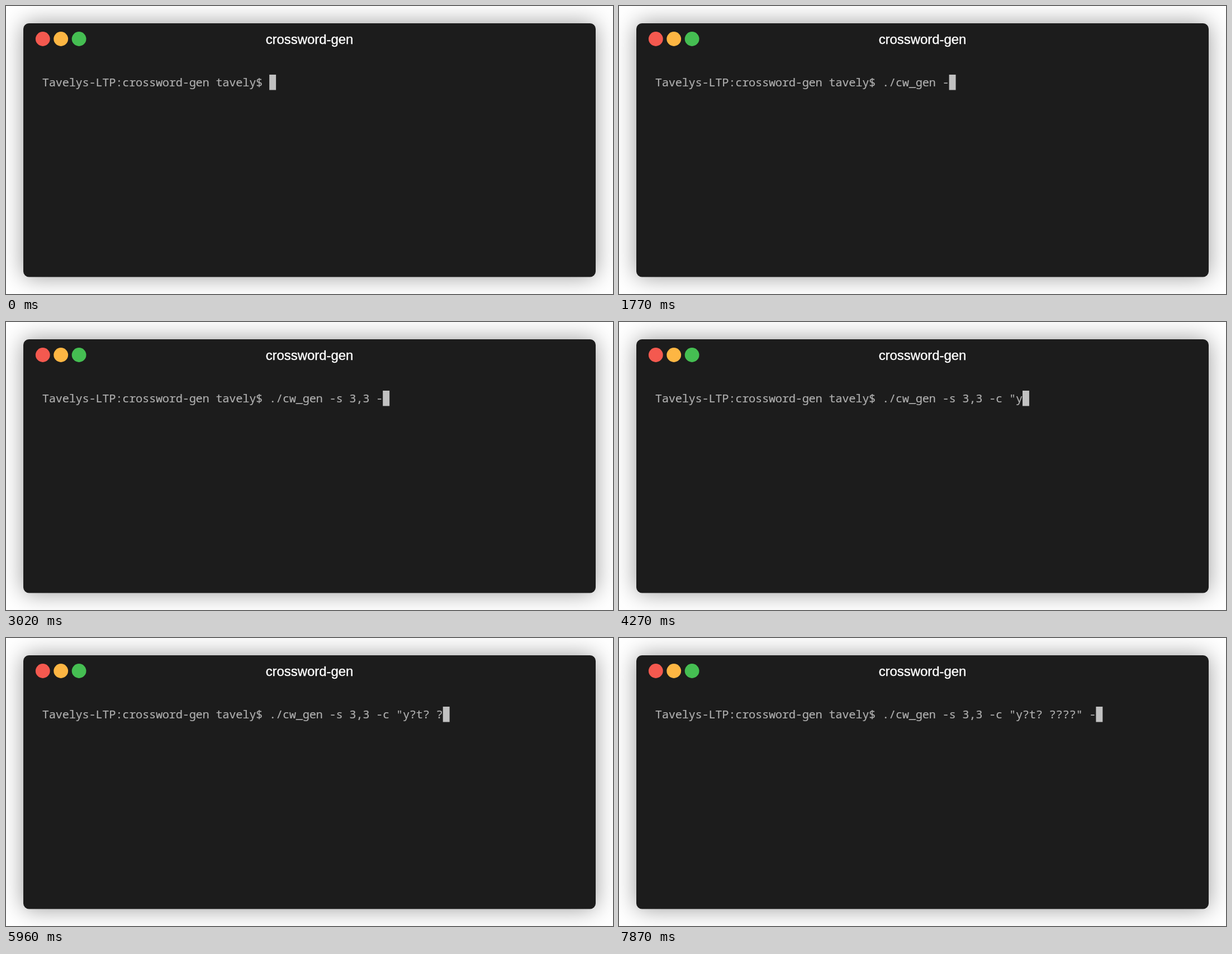
Recreate the animation shown at these times as an HTML page with a canvas. Size 1086 by 516 pixels, loop 8000 ms.

```html
<!DOCTYPE html>
<html lang="en">
<head>
<meta charset="utf-8">
<title>crossword-gen</title>
<style>
  html, body { margin: 0; width: 100%; height: 100%; overflow: hidden; background: #fff; }
  canvas { display: block; }
</style>
</head>
<body>
<canvas id="stage" width="1086" height="516"></canvas>
<script>
const ctx = document.getElementById("stage").getContext("2d");
const LOOP = 8000;
const CELL = 11.945;
const LEFT = 65;
const BASELINE = 144;

const prompt = "Tavelys-LTP:crossword-gen tavely$ ";

// Typing comes in bursts with a steady gap between keys.
const bursts = [
  { text: "./cw", start: 400, gap: 163 },
  { text: "_ge", start: 1130, gap: 110 },
  { text: "n -s 3,", start: 1490, gap: 140 },
  { text: "3 ", start: 2570, gap: 150 },
  { text: "-c ", start: 3020, gap: 175 },
  { text: '"y', start: 3850, gap: 420 },
  { text: "?t", start: 5000, gap: 0 },
  { text: "? ?", start: 5420, gap: 260 },
  { text: "???", start: 6300, gap: 155 },
  { text: '" ', start: 6900, gap: 150 },
  { text: "-", start: 7870, gap: 0 }
];

function typedAt(t) {
  return bursts.map(({ text, start, gap }) =>
    [...text].filter((ch, i) => t >= start + i * gap).join("")
  ).join("");
}

function drawWindow() {
  ctx.fillStyle = "#fff";
  ctx.fillRect(0, 0, 1086, 516);
  ctx.save();
  ctx.shadowColor = "rgba(0, 0, 0, 0.4)";
  ctx.shadowBlur = 40;
  ctx.fillStyle = "#1c1c1c";
  ctx.beginPath();
  ctx.roundRect(31, 31, 1024, 454.5, 10);
  ctx.fill();
  ctx.restore();
}

function drawButton(x, color) {
  ctx.fillStyle = color;
  ctx.beginPath();
  ctx.arc(x, 59, 12.9, 0, Math.PI * 2);
  ctx.fill();
}

// A hairline outline gives the slightly heavier weight of smoothed text.
function drawText(text, x, y, color, weight) {
  ctx.fillStyle = ctx.strokeStyle = color;
  ctx.lineWidth = weight;
  ctx.fillText(text, x, y);
  ctx.strokeText(text, x, y);
}

function drawTitle() {
  ctx.font = '23.9px "Liberation Sans", Arial, sans-serif';
  ctx.textAlign = "center";
  drawText("crossword-gen", 543, 68, "#fff", 0.4);
}

function drawLine(text) {
  ctx.font = '20.4px "Noto Sans Mono", monospace';
  ctx.textAlign = "center";
  [...text].forEach((ch, i) =>
    drawText(ch, LEFT + (i + 0.5) * CELL, BASELINE, "#afafaf", 0.2));
  ctx.fillStyle = "#c1c1c1";
  ctx.fillRect(LEFT + text.length * CELL, 123, CELL, 27.5);
}

function frame(now) {
  drawWindow();
  drawButton(65.8, "#f4594f");
  drawButton(98.2, "#fdb643");
  drawButton(130.6, "#45be52");
  drawTitle();
  drawLine(prompt + typedAt(now % LOOP));
  requestAnimationFrame(frame);
}
requestAnimationFrame(frame);
</script>
</body>
</html>
```
